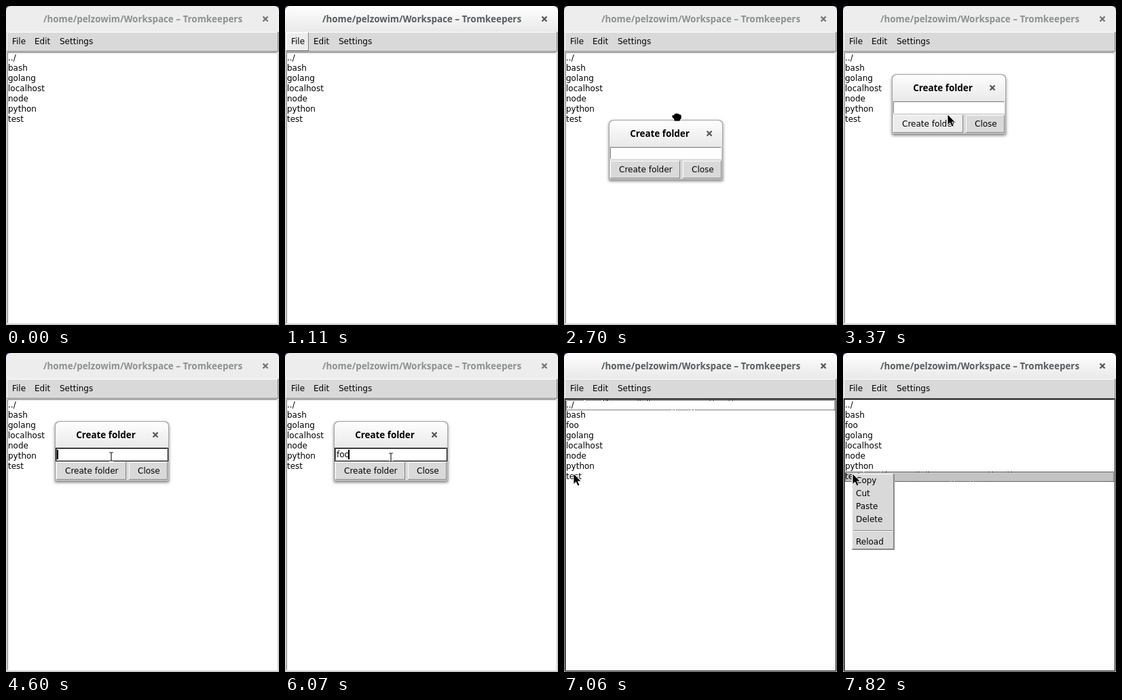
Write an HTML page that moves like this. It is 402 px wide and 468 px high and loops after 8 s.

```html
<!DOCTYPE html>
<html lang="en">
<head>
<meta charset="utf-8">
<title>File manager</title>
<style>
  html, body { margin: 0; width: 100%; height: 100%; overflow: hidden; background: #d9d9d9; }
  svg { display: block; }
  text { font: 12px "DejaVu Sans", sans-serif; fill: #000; white-space: pre; }
  .title { font: bold 13.4px "Noto Sans", "Open Sans", sans-serif; text-anchor: middle; }
  rect { shape-rendering: crispEdges; }
  #dialog { filter: drop-shadow(0 2px 2px rgba(0, 0, 0, .5)); }
</style>
</head>
<body>
<svg id="stage" width="402" height="468" viewBox="0 0 402 468">
  <defs>
    <linearGradient id="bar" x1="0" y1="0" x2="0" y2="1">
      <stop offset="0" stop-color="#fefefe"/>
      <stop offset="1" stop-color="#e9e9e9"/>
    </linearGradient>
  </defs>
</svg>
<script>
const LOOP = 8000;
const stage = document.getElementById('stage');
const GRAY = '#d9d9d9', DARK = '#828282', LIT = '#ececec', WHITE = '#ffffff';

function add(parent, tag, attrs = {}, content) {
  const el = document.createElementNS('http://www.w3.org/2000/svg', tag);
  for (const key in attrs) el.setAttribute(key, attrs[key]);
  if (content) el.textContent = content;
  parent.appendChild(el);
  return el;
}
const group = (parent, id) => add(parent, 'g', id ? { id } : {});
const box = (p, x, y, width, height, fill) => add(p, 'rect', { x, y, width, height, fill });
const label = (p, x, y, s) => add(p, 'text', { x, y }, s);
const show = (el, on) => el.setAttribute('visibility', on ? 'inherit' : 'hidden');
const place = (el, x, y) => el.setAttribute('transform', `translate(${x} ${y})`);

// One-pixel relief; returns the face so it can be recoloured
function bevel(p, x, y, w, h, face, light = WHITE, dark = DARK) {
  box(p, x, y, w, h, dark);
  box(p, x, y, w - 1, h - 1, light);
  return box(p, x + 1, y + 1, w - 2, h - 2, face);
}
const sunken = (p, x, y, w, h) => bevel(p, x, y, w, h, WHITE, DARK, LIT);

function dotted(p, y) {
  return add(p, 'rect', { x: 3.5, y: y + .5, width: 395, height: 14, fill: 'none',
    stroke: '#000', 'stroke-dasharray': '1 1' });
}
function titleBar(p, w, h, s, cx, by) {
  const shape = add(p, 'path', {
    d: `M0 ${h}V7Q0 0 7 0H${w - 7}Q${w} 0 ${w} 7V${h}Z`, fill: 'url(#bar)' });
  const text = add(p, 'text', { x: cx, y: by, class: 'title' }, s);
  return { shape, text };
}
function closeMark(p, x, y) {
  return add(p, 'path', { d: `M${x - 3.5} ${y - 3.5}l7 7m0 -7l-7 7`, stroke: '#53585a', 'stroke-width': 2.3 });
}

// Main window
box(stage, 0, 0, 402, 468, '#20233c');
const main = group(stage);
box(main, 0, 38, 402, 430, '#c4c4c4');
const head = titleBar(main, 402, 38, '/home/pelzowim/Workspace – Tromkeepers', 201.5, 24);
const cross = closeMark(main, 382, 19);
bevel(main, 1, 38, 400, 29, GRAY);
const fileLit = group(main);
bevel(fileLit, 2, 39, 33, 27, LIT);
label(main, 9, 56, 'File');
label(main, 42, 56, 'Edit');
label(main, 79, 56, 'Settings');

const ring = box(main, 1, 67, 400, 400, GRAY);
sunken(main, 2, 68, 398, 398);
const selected = box(main, 3, 174, 396, 15, '#c3c3c3');
const marker = dotted(main, 0);
const rowTop = i => 69 + 15 * i;
const row = (p, i, s) => label(p, 3, rowTop(i) + 11, s);
['../', 'bash'].forEach((s, i) => row(main, i, s));
const foo = row(main, 2, 'foo');
const rest = group(main);
['golang', 'localhost', 'node', 'python', 'test'].forEach((s, i) => row(rest, i + 2, s));

// Dialog
const dialog = group(stage, 'dialog');
add(dialog, 'path', { d: 'M0 88V7Q0 0 7 0H161Q168 0 168 7V88Z', fill: '#a3a3a3' });
const inner = group(dialog);
place(inner, 1, 1);
titleBar(inner, 166, 38, 'Create folder', 74, 24);
closeMark(dialog, 148, 20);
box(dialog, 1, 39, 166, 48, GRAY);
const entryRing = box(dialog, 1, 39, 166, 20, GRAY);
sunken(dialog, 2, 40, 164, 18);
const typed = label(dialog, 4, 53, '');
const caret = box(dialog, 0, 42, 2, 14, '#000');
const create = bevel(dialog, 2, 60, 103, 26, GRAY);
label(dialog, 15, 77, 'Create folder');
bevel(dialog, 109, 60, 57, 26, GRAY);
label(dialog, 122, 77, 'Close');

// Context menu
const menu = group(stage);
box(menu, 14, 178, 62, 111, '#8f8f8f');
bevel(menu, 13, 177, 62, 111, GRAY);
['Copy', 'Cut', 'Paste', 'Delete'].forEach((s, i) => label(menu, 19, 191 + 19 * i, s));
box(menu, 15, 260, 58, 1, DARK);
box(menu, 15, 261, 58, 1, WHITE);
label(menu, 19, 281, 'Reload');

// Pointers
const arrow = add(stage, 'path', {
  d: 'M0 0V15.5L3.6 12.2L6.3 18L9 16.8L6.4 11.2H11.2Z',
  fill: '#000', stroke: '#fff', 'stroke-width': .8 });
const beam = group(stage);
const beamPath = 'M-3 -6H-1Q0 -6 0 -5Q0 -6 1 -6H3M0 -5V5M-3 6H-1Q0 6 0 5Q0 6 1 6H3';
add(beam, 'path', { d: beamPath, fill: 'none', stroke: '#fff', 'stroke-width': 3 });
add(beam, 'path', { d: beamPath, fill: 'none', stroke: '#222', 'stroke-width': 1.2 });
const hand = add(stage, 'path', {
  d: 'M-4 6V3L-7 0V-3H-4V-4Q-3 -6 -1.5 -5Q0 -7 1.5 -5Q3 -6 4 -4Q6 -5 7 -2V2L5 4V6Z',
  fill: '#000', stroke: '#fff', 'stroke-width': .7 });
const pointers = { arrow, beam, hand };

// time, dialog x, y, hand x, y
const drag = [
  [2620, -14, 425, 110, 400], [2660, 30, 300, 145, 230], [2700, 66, 167, 166, 163],
  [2740, 70, 128, 171, 138], [2780, 71, 112, 173, 130], [2820, 72, 104, 174, 127],
  [2860, 72, 100, 174, 127]
];
// start, pointer, from, to, steps, step length
const moves = [
  [3070, 'arrow', [168, 121], [154, 159], 8, 42.8],
  [3540, 'beam', [155, 157], [155, 152], 4, 56],
  [6070, 'beam', [156, 153], [156, 153], 1, 40],
  [6110, 'arrow', [152, 160], [143, 173], 3, 40],
  [6440, 'arrow', [140, 173], [14, 177], 15, 44.2]
];
// time, text, caret x in the dialog (-1 = off)
const typing = [
  [0, '', -1], [3710, '', 3], [4300, '', -1], [4600, '', 3], [4760, 'f', 7], [4970, 'fo', 14],
  [5130, 'foo', 21], [5180, 'foo', -1], [5480, 'foo', 21], [6110, 'foo', -1]
];
const latest = (table, t) => table.filter(r => r[0] <= t).pop();
const within = (t, a, b) => t >= a && t < b;
const ease = p => p * p * (3 - 2 * p);

function pointerAt(t) {
  const move = latest(moves, t);
  if (move) {
    const [start, kind, from, to, n, len] = move;
    const k = Math.min(n - 1, Math.floor((t - start) / len + .001));
    const p = n > 1 ? ease(k / (n - 1)) : 1;
    return [kind, ...from.map((v, i) => Math.round(v + (to[i] - v) * p))];
  }
  const d = latest(drag, t);
  return d && ['hand', d[3], d[4]];
}

function draw(t) {
  const active = within(t, 1110, 1910) || t >= 6400;
  head.shape.setAttribute('fill', active ? 'url(#bar)' : '#ededed');
  head.text.style.fill = active ? '#585d5f' : '#8d9091';
  cross.setAttribute('stroke', active ? '#53585a' : '#717475');
  ring.setAttribute('fill', within(t, 1150, 1910) || t >= 6400 ? '#000' : GRAY);
  show(fileLit, within(t, 920, 1870));

  const grown = t >= 6360;
  show(foo, grown);
  place(rest, 0, grown ? 15 : 0);
  show(selected, t >= 7270);
  show(marker, within(t, 1190, 1910) || t >= 6400);
  marker.setAttribute('y', rowTop(t >= 7380 ? 7 : t >= 6400 ? 0 : 6) + .5);

  show(dialog, within(t, 2620, 6400));
  const d = latest(drag, t);
  if (d) place(dialog, d[1], d[2]);
  const [, text, caretX] = latest(typing, t);
  typed.textContent = text;
  show(caret, caretX >= 0);
  caret.setAttribute('x', caretX);
  entryRing.setAttribute('fill', t >= 3710 ? '#000' : GRAY);
  create.setAttribute('fill', within(t, 3325, 3540) || t >= 6150 ? LIT : GRAY);
  show(menu, t >= 7820);

  const now = pointerAt(t);
  for (const kind in pointers) show(pointers[kind], now && now[0] === kind);
  if (now) place(pointers[now[0]], now[1], now[2]);
}

const began = performance.now();
function tick() {
  draw((performance.now() - began) % LOOP);
  requestAnimationFrame(tick);
}
tick();
</script>
</body>
</html>
```
